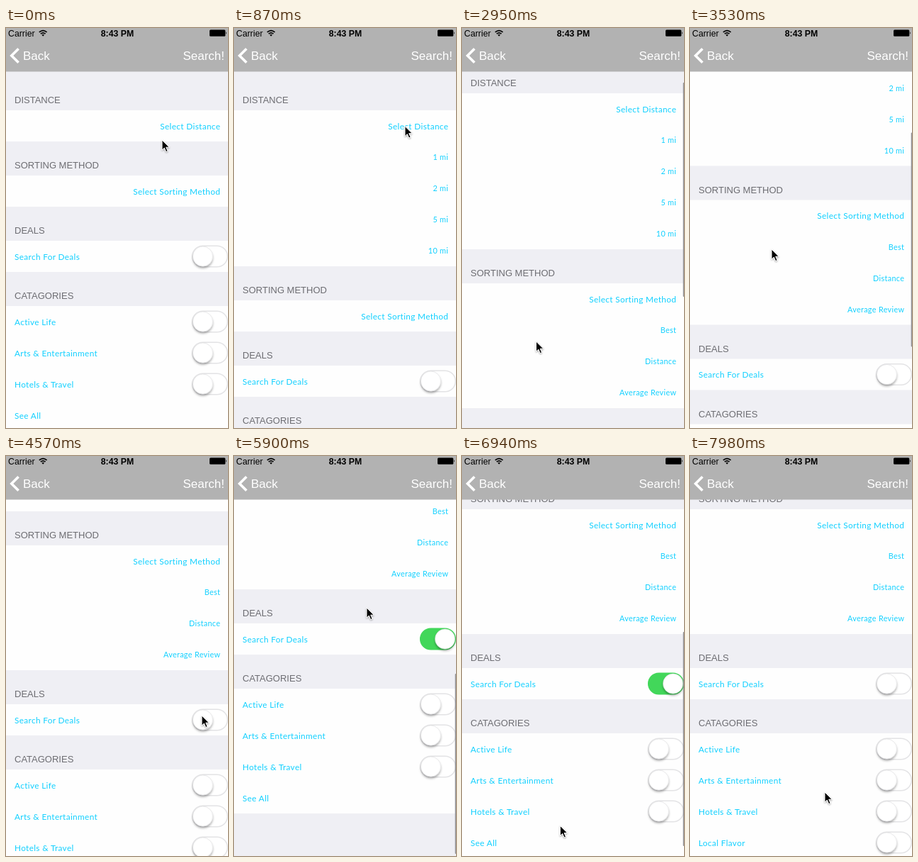
Recreate the animation shown at these times as an HTML page. Size 313 by 564 pixels, loop 8000 ms.

```html
<!DOCTYPE html>
<html lang="en">
<head>
<meta charset="utf-8">
<title>Search filters</title>
<style>
html, body { margin: 0; width: 100%; height: 100%; overflow: hidden; background: #efeff4; }
svg { display: block; width: 313px; height: 564px; }
.head { font: 13px "Liberation Sans", Arial, sans-serif; fill: #6d6d72; }
.row { font: 11.8px Lato, sans-serif; }
.option { font: 10.8px Lato, sans-serif; }
.row, .option { fill: #12d0ff; letter-spacing: .35px; font-variant-ligatures: none; }
.nav { font: 17px "Liberation Sans", Arial, sans-serif; fill: #fff; }
.status { font: 12.3px "Liberation Sans", Arial, sans-serif; }
.bold { font-weight: bold; }
</style>
</head>
<body>
<svg viewBox="0 0 313 564">
  <defs>
    <filter id="soft" x="-50%" y="-50%" width="200%" height="200%">
      <feDropShadow dx="0" dy="2.5" stdDeviation="1.6" flood-opacity=".32"/>
    </filter>
    <filter id="faint" x="-50%" y="-50%" width="200%" height="200%">
      <feDropShadow dx="0" dy="1" stdDeviation="1" flood-opacity=".4"/>
    </filter>
  </defs>
  <rect width="313" height="564" fill="#efeff4"/>
  <g id="list"></g>
  <rect id="bar" x="311.7" width="2" rx="1" fill="#8e8e93"/>
  <rect width="313" height="61.5" fill="#b2b2b2"/>
  <path d="M17.6 29.2 7.8 39l9.8 9.8" fill="none" stroke="#fff" stroke-width="3.6"/>
  <text class="nav" x="24" y="45">Back</text>
  <text class="nav" x="308" y="45" text-anchor="end">Search!</text>
  <text class="status" x="3" y="12">Carrier</text>
  <text class="status bold" x="157" y="12" text-anchor="middle">8:43 PM</text>
  <g fill="none" stroke="#000" stroke-width="1.7">
    <path d="M46.8 5.9q5.4-4.6 10.8 0M48.8 8.2q3.4-2.8 6.8 0"/>
    <path d="M50.3 9.6q1.9-1.4 3.8 0l-1.9 2.1z" fill="#000" stroke="none"/>
  </g>
  <rect x="287" y="2.5" width="22.3" height="9.3" rx="1.5"/>
  <path d="M310 5.6q1.8 1.6 0 3.2z"/>
  <path id="cursor" d="M0 0v14.2l3.3-3.1 2.4 5.5 2.4-1-2.4-5.4h4.6z" stroke="#fff" stroke-width="1" filter="url(#faint)"/>
</svg>
<script>
const LOOP = 8000, TICK = 147.5, ROW = 44, HEAD = 48;
const list = document.getElementById('list');
const bar = document.getElementById('bar');
const cursor = document.getElementById('cursor');

function add(parent, tag, attrs, text) {
  const el = document.createElementNS('http://www.w3.org/2000/svg', tag);
  for (const k in attrs) el.setAttribute(k, attrs[k]);
  if (text) el.textContent = text;
  return parent.appendChild(el);
}
const shift = (el, x, y) => el.setAttribute('transform', `translate(${x} ${y})`);
const fade = (el, v) => el.setAttribute('opacity', v);

function makeSwitch(row) {
  const track = add(row, 'rect', { x: 262.7, y: 7.2, width: 49.6, height: 29.6, rx: 14.8, 'stroke-width': 1.5 });
  const knob = add(row, 'circle', { cy: 22, r: 14, fill: '#fff',
    stroke: '#d4d4d6', 'stroke-width': .5, filter: 'url(#soft)' });
  return on => {
    track.setAttribute('fill', on > .5 ? '#42d75a' : '#fff');
    track.setAttribute('stroke', on > .5 ? '#42d75a' : '#e3e3e5');
    knob.setAttribute('cx', 277.5 + 20 * on);
  };
}

function makeRow(parent, label, i, kind) {
  const row = add(parent, 'g', {});
  shift(row, 0, i * ROW);
  const right = kind === 'pick' || kind === 'option';
  add(row, 'text', { x: right ? 302.3 : 12, y: kind === 'option' ? 26 : 26.6,
    class: kind === 'option' ? 'option' : 'row', 'text-anchor': right ? 'end' : 'start' }, label);
  if (kind === 'switch') {
    row.set = makeSwitch(row);
    row.set(0);
  }
  return row;
}

function makeSection(title) {
  const g = add(list, 'g', {});
  const back = add(g, 'rect', { width: 313, height: ROW, fill: '#fefefe' });
  add(g, 'text', { x: 12, y: -9.6, class: 'head' }, title);
  return { g, back, extra: [] };
}

function makePicker(title, label, options) {
  const s = makeSection(title);
  makeRow(s.g, label, 0, 'pick');
  s.extra = options.map((o, i) => makeRow(s.g, o, i + 1, 'option'));
  return s;
}

const distance = makePicker('DISTANCE', 'Select Distance', ['1 mi', '2 mi', '5 mi', '10 mi']);
const sorting = makePicker('SORTING METHOD', 'Select Sorting Method', ['Best', 'Distance', 'Average Review']);
const deals = makeSection('DEALS');
const dealRow = makeRow(deals.g, 'Search For Deals', 0, 'switch');
const groups = makeSection('CATAGORIES');
['Active Life', 'Arts & Entertainment', 'Hotels & Travel'].forEach((n, i) => makeRow(groups.g, n, i, 'switch'));
const seeAll = makeRow(groups.g, 'See All', 3, 'plain');
const local = makeRow(groups.g, 'Local Flavor', 3, 'switch');

// Smooth step from 0 to 1 between ticks a and b.
function ramp(k, a, b) {
  const p = Math.min(1, Math.max(0, (k - a) / (b - a)));
  return p * p * (3 - 2 * p);
}

// Eased path through [tick, value, ...] stops.
const follow = (stops, k, n = 1) => stops.slice(1).reduce(
  (v, s, i) => v + (s[n] - stops[i][n]) * ramp(k, stops[i][0], s[0]), stops[0][n]);

// Clicks, drags and rests of the pointer.
const pointer = [[0, 220, 158], [3, 241, 138.5], [7, 241, 138.5], [12, 258, 405], [15, 258, 405],
  [18, 105, 466], [20, 104.5, 442], [24, 115, 312], [31, 276, 366], [33, 276, 366], [36, 166, 404],
  [37, 166, 404], [40, 187, 214], [43, 176, 326], [48, 134, 544], [51, 134, 544], [54, 190, 474]];
const scroll = [[18, 0], [20, 24], [21, 25], [27, 258], [37, 258], [40, 372], [43, 320], [47, 309]];

function draw(time) {
  const k = Math.floor((time % LOOP + 16) / TICK);
  const top = follow(scroll, k);
  const more = ramp(k, 48, 50);
  let y = 116 - top;

  function place(s, rows, open = 0) {
    const size = ROW * (rows + s.extra.length * open);
    shift(s.g, 0, y);
    s.back.setAttribute('height', size);
    s.extra.forEach((r, i) => {
      fade(r, open);
      shift(r, 0, (i + 1) * ROW * open);
    });
    y += size + HEAD;
  }
  place(distance, 1, ramp(k, 3, 6));
  place(sorting, 1, ramp(k, 13, 16));
  place(deals, 1);
  place(groups, 4 + 6 * more);
  dealRow.set(ramp(k, 32, 33) - more);
  fade(seeAll, 1 - more);
  fade(local, more);

  // The scroll bar shrinks past the end and fades once the list rests.
  const over = Math.max(0, top - 324), len = 302 - over;
  const moved = n => Math.abs(follow(scroll, k - n) - follow(scroll, k - n - 1)) > .01;
  bar.setAttribute('height', len);
  bar.setAttribute('y', over ? 561 - len : 62.5 + .6 * top);
  fade(bar, moved(0) ? 1 : moved(1) ? .5 : 0);
  shift(cursor, follow(pointer, k), follow(pointer, k, 2));
}

function loop() {
  draw(performance.now());
  requestAnimationFrame(loop);
}
loop();
</script>
</body>
</html>
```
